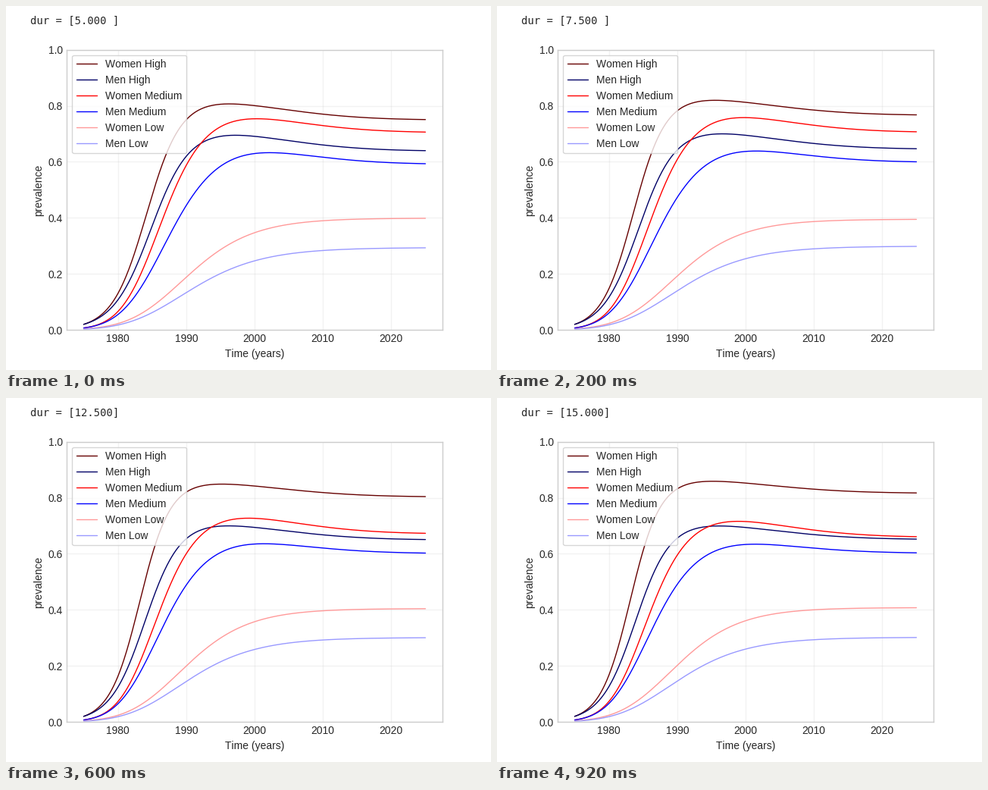
Write a matplotlib script that moves like this. It is 640 px wide and 480 px high and loops after 1000 ms.

```python
import numpy as np
import matplotlib.pyplot as plt
from matplotlib.animation import FuncAnimation

plt.rcParams.update({
    "font.family": "Liberation Sans", "font.size": 10,
    "text.kerning_factor": 6,
    "text.color": "0.15", "axes.labelcolor": "0.15",
    "xtick.color": "0.15", "ytick.color": "0.15",
    "xtick.major.size": 0, "ytick.major.size": 0,
    "axes.edgecolor": "0.8", "axes.linewidth": 1, "axes.axisbelow": True,
    "lines.linewidth": 1, "lines.solid_capstyle": "round",
})

SHORT, LONG, STEP = 5, 15, 2.5
FRAMES = int((LONG - SHORT) / STEP) + 1
YEARS = np.linspace(1975, 2025, 501)


def mix(pair, weight):
    return pair[0] + (pair[1] - pair[0]) * weight


def prevalence(duration, start, plateau, hump, rate, skew):
    """Skewed logistic growth towards a plateau with an early hump.

    plateau holds the levels for durations 5, 7.5 and 15; hump and rate
    hold the values for the shortest and the longest duration.
    """
    log_weight = np.log(duration / SHORT) / np.log(LONG / SHORT)
    # Growth slows with the recovery rate 1 / duration.
    recovery_weight = (1 / SHORT - 1 / duration) / (1 / SHORT - 1 / LONG)

    level = np.interp(np.log(duration), np.log([SHORT, 7.5, LONG]), plateau)
    ceiling = level + mix(hump, log_weight) * np.exp(-((YEARS - 1990) / 18) ** 2)
    gap = (ceiling[0] / start) ** skew - 1
    decay = np.exp(-mix(rate, recovery_weight) * (YEARS - YEARS[0]))
    return ceiling * (1 + gap * decay) ** (-1 / skew)


GROUPS = [
    ("Women High", "#660000", dict(start=0.02, plateau=(0.749, 0.766, 0.816),
                                   hump=(0.072, 0.05), rate=(0.4, 0.46), skew=1)),
    ("Men High", "#000066", dict(start=0.02, plateau=(0.638, 0.645, 0.651),
                                 hump=(0.076, 0.06), rate=(0.358, 0.398), skew=1)),
    ("Women Medium", "#ff0000", dict(start=0.007, plateau=(0.704, 0.705, 0.659),
                                     hump=(0.09, 0.09), rate=(0.27, 0.287), skew=0.5)),
    ("Men Medium", "#0000ff", dict(start=0.007, plateau=(0.591, 0.598, 0.602),
                                   hump=(0.1, 0.068), rate=(0.218, 0.243), skew=0.4)),
    ("Women Low", "#ff9999", dict(start=0.004, plateau=(0.399, 0.395, 0.408),
                                  hump=(0, 0), rate=(0.181, 0.187), skew=0.4)),
    ("Men Low", "#9999ff", dict(start=0.003, plateau=(0.294, 0.299, 0.302),
                                hump=(0, 0), rate=(0.16, 0.167), skew=0.3)),
]

fig, ax = plt.subplots(figsize=(6.4, 4.8), dpi=100)
lines = [ax.plot(YEARS, prevalence(SHORT, **shape), color=color, label=label)[0]
         for label, color, shape in GROUPS]
ax.set(xlim=(1972.5, 2027.5), ylim=(0, 1),
       xlabel="Time (years)", ylabel="prevalence",
       xticks=range(1980, 2021, 10))
ax.grid(color="0.8", alpha=0.25, linewidth=1)
ax.legend(loc="upper left", frameon=True, framealpha=0.8, edgecolor="0.8")
caption = fig.text(0.05, 0.95, "", family="DejaVu Sans Mono")


def draw(i):
    duration = SHORT + i * STEP
    for line, (_, _, shape) in zip(lines, GROUPS):
        line.set_ydata(prevalence(duration, **shape))
    value = f"{duration:.3f}"
    caption.set_text(f"dur = [{value:<6}]")
    return lines + [caption]


anim = FuncAnimation(fig, draw, frames=FRAMES, interval=200, repeat=True)
plt.show()
```
